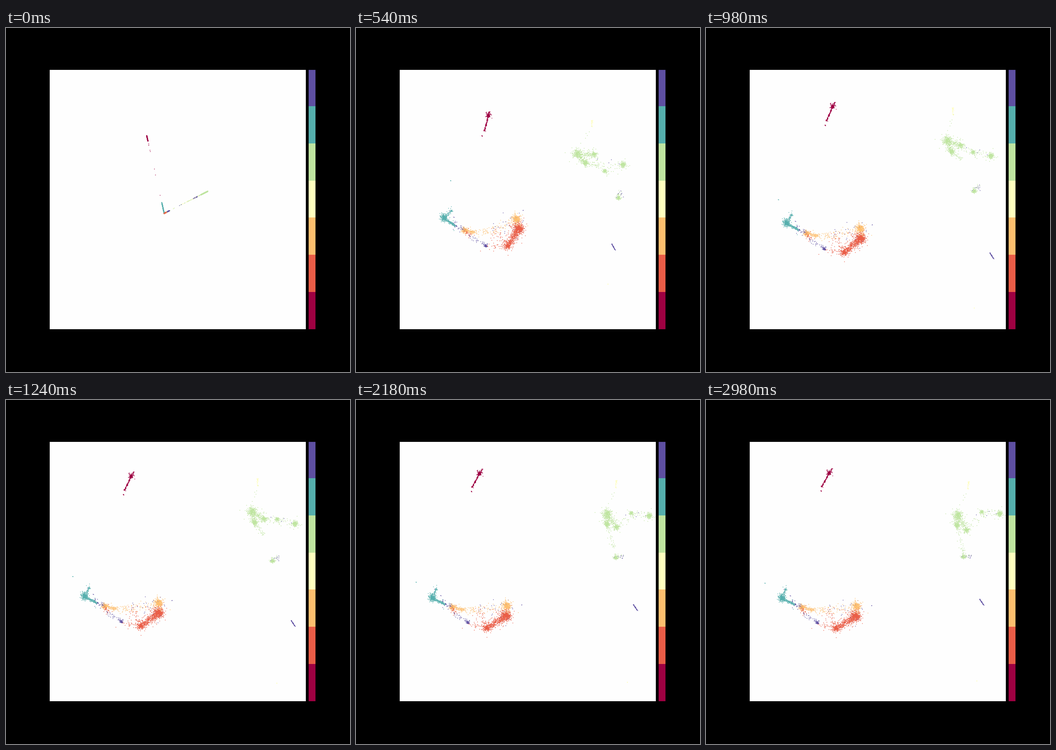
These frames come from a looping animation (748x748 px, 3030 ms). A matplotlib script:

```python
import matplotlib.pyplot as plt
import numpy as np
from matplotlib.animation import FuncAnimation

SIZE, DPI = 748, 100
LOOP, INTERVAL, STEP = 3030, 10, 20
BURST, TURN, LAST = 340, 760, 2980  # ms: end of burst, mid-way, rest
SETTLE = 700
LEFT, RIGHT = 0.125 * SIZE, 651.8
TOP, BOTTOM = 0.12 * SIZE, 0.875 * SIZE
RED, CORAL, ORANGE, YELLOW, GREEN, TEAL, BLUE = range(7)

# name: colour, blob spread, place after the burst, place at rest, optional turn.
ANCHORS = {
    "top": (RED, 0, (299, 202), (274, 149)),
    "waist": (RED, 2.6, (300, 209), (268, 159)),
    "end": (RED, 1.0, (296, 244), (252, 188)),
    "tip": (RED, 0.7, (288, 257), (250, 198)),
    "head": (TEAL, 3.9, (206, 402), (164, 431)),
    "spur": (TEAL, 1.2, (228, 389), (173, 412)),
    "tail": (TEAL, 0, (230, 422), (193, 445)),
    "pale": (ORANGE, 2.9, (252, 433), (208, 450)),
    "pale2": (ORANGE, 0, (272, 437), (235, 457)),
    "sag": (ORANGE, 0, (318, 432), (265, 458)),
    "crown": (ORANGE, 4.6, (361, 396), (327, 449)),
    "right": (CORAL, 5.6, (371, 415), (326, 470)),
    "foot": (CORAL, 3.2, (358, 461), (282, 497)),
    "ink": (BLUE, 0, (268, 443), (213, 463)),
    "ink2": (BLUE, 1.9, (306, 467), (242, 484)),
    "dot": (BLUE, 0.4, (365, 366), (360, 447)),
    "west": (TEAL, 0.5, (252, 292), (128, 398)),
    "main": (GREEN, 4.2, (437, 314), (547, 250), (508, 253)),
    "east": (GREEN, 2.8, (478, 315), (567, 283), (542, 258)),
    "south": (GREEN, 3.0, (460, 327), (546, 273), (522, 276)),
    "drop": (GREEN, 0, (490, 343), (559, 330), (545, 283)),
    "link": (GREEN, 2.4, (500, 350), (600, 244), (567, 286)),
    "far": (GREEN, 3.4, (540, 305), (638, 247), (605, 287)),
    "low": (GREEN, 2.6, (543, 381), (560, 341), (582, 361)),
    "hook": (GREEN, 0, (539, 370), (574, 339), (588, 347)),
    "sun": (YELLOW, 0, (502, 238), (572, 176), (526, 180)),
    "sun2": (YELLOW, 0.7, (499, 248), (569, 192), (526, 195)),
    "seed": (YELLOW, 0.5, (505, 491), (589, 611), (572, 593)),
    "dash": (BLUE, 0, (465, 414), (595, 433), (601, 489)),
    "dash2": (BLUE, 0, (472, 428), (604, 446), (609, 502)),
}

# Colour, two anchors, spread, density.
LINKS = [
    (RED, "top", "waist", 0.7, 3), (RED, "waist", "end", 0.7, 2),
    (TEAL, "head", "tail", 1.6, 3), (TEAL, "head", "spur", 2.6, 0.7),
    (BLUE, "tail", "pale", 2.5, 0.5), (BLUE, "spur", "tail", 3, 0.1),
    (ORANGE, "pale", "pale2", 2.8, 2), (ORANGE, "pale2", "sag", 4.5, 0.2),
    (ORANGE, "sag", "crown", 5, 0.15), (ORANGE, "crown", "right", 5, 0.4),
    (CORAL, "pale", "ink", 3.5, 0.6), (CORAL, "right", "foot", 5, 2),
    (CORAL, "sag", "foot", 7, 0.12), (CORAL, "ink2", "foot", 5, 0.14),
    (BLUE, "ink", "ink2", 3, 0.2), (BLUE, "sag", "crown", 7, 0.04),
    (BLUE, "crown", "right", 11, 0.05),
    (GREEN, "main", "east", 4.5, 0.7), (GREEN, "main", "south", 4, 1.2),
    (GREEN, "south", "drop", 2.6, 0.4), (GREEN, "east", "link", 5, 0.12),
    (GREEN, "link", "far", 4.5, 0.1), (GREEN, "low", "hook", 2, 0.8),
    (BLUE, "low", "hook", 3.5, 0.25), (BLUE, "main", "far", 4, 0.01),
    (GREEN, "main", "sun2", 2.5, 0.03), (YELLOW, "sun", "sun2", 1.3, 1.6),
    (BLUE, "dash", "dash2", 0.3, 2),
]

# The start is an L of two thin rays: which ray, and the stretch filled on it.
CORNER = np.array([344, 403])
UP, ACROSS = np.array([-38, -169]), np.array([95, -48])
BIRTH = {
    RED: (UP, 0.93, 1), TEAL: (UP, 0, 0.14), CORAL: (ACROSS, 0, 0.05),
    ORANGE: (ACROSS, 0, 0.06), YELLOW: (ACROSS, 0.4, 0.8),
    GREEN: (ACROSS, 0.84, 1), BLUE: (ACROSS, 0.06, 0.12),
}
DASH_BIRTH = (ACROSS, 0.68, 0.76)

rng = np.random.default_rng(7)


def progress(t):
    return (1 - np.exp((BURST - t) / SETTLE)) / (1 - np.exp((BURST - LAST) / SETTLE))


def curve(name):
    """Quadratic Bezier points of an anchor, passing its turn at TURN."""
    early, late, *via = np.array(ANCHORS[name][2:], dtype=float)
    turn = via[0] if via else early + 0.62 * (late - early)
    p = progress(TURN)
    bend = (turn - (1 - p) ** 2 * early - p * p * late) / (2 * p * (1 - p))
    return np.array([early, bend, late])


def born(colour, n, x):
    ray, lo, hi = DASH_BIRTH if colour == BLUE and x > 400 else BIRTH[colour]
    reach = rng.uniform(lo, hi, n) - 0.75 * rng.random(n) ** 60
    return CORNER + np.maximum(reach, 0)[:, None] * ray + rng.normal(0, 0.3, (n, 2))


def group(colour, a, b, spread, n):
    """Birth place and curve points of n dots between two anchors."""
    ca, cb = curve(a), curve(b)
    along = rng.random((n, 1))
    noise = rng.normal(0, spread, (n, 2)) * (0.7 + 0.3 * rng.exponential(size=(n, 1)))
    stops = [p + (q - p) * along + noise for p, q in zip(ca, cb)]
    return np.array([born(colour, n, ca[0, 0]), *stops]), np.full(n, colour)


def all_groups():
    for name, (colour, spread, *_) in ANCHORS.items():
        yield group(colour, name, name, spread, round(12 * spread ** 2))
    for colour, a, b, spread, density in LINKS:
        length = np.hypot(*(curve(a)[0] - curve(b)[0]))
        yield group(colour, a, b, spread, round(density * length * max(spread, 1.5)))


dots, shade = zip(*all_groups())
dots, shade = np.concatenate(dots, axis=1), np.concatenate(shade)
order = rng.permutation(len(shade))
birth, early, bend, late = dots[:, order]
shade = shade[order]


def points_at(t):
    if t < BURST:
        return birth + (early - birth) * (t / BURST) ** 0.6
    p = progress(t)
    return (1 - p) ** 2 * early + 2 * p * (1 - p) * bend + p * p * late


fig = plt.figure(figsize=(SIZE / DPI, SIZE / DPI), dpi=DPI, facecolor="black")


def pixel_axes(x0, x1):
    ax = fig.add_axes([x0 / SIZE, 1 - BOTTOM / SIZE,
                       (x1 - x0) / SIZE, (BOTTOM - TOP) / SIZE])
    ax.set(xticks=[], yticks=[])
    return ax


cmap = plt.get_cmap("Spectral", 7)
ax = pixel_axes(LEFT, RIGHT)
ax.set_facecolor("#fefefe")
ax.set(xlim=(LEFT, RIGHT), ylim=(BOTTOM, TOP))
dot_size = (1.55 * 72 / DPI) ** 2
cloud = ax.scatter(*birth.T, s=dot_size, color=cmap(shade), linewidths=0)

bar = pixel_axes(657.2, 0.9 * SIZE)
bar.pcolormesh([0, 1], np.arange(8), np.arange(7)[:, None], cmap=cmap)
bar.set(xticks=[], yticks=[])


def update(i):
    t = min(i * INTERVAL // STEP * STEP, LAST)
    cloud.set_offsets(points_at(t))
    return [cloud]


anim = FuncAnimation(fig, update, frames=LOOP // INTERVAL, interval=INTERVAL,
                     repeat=True, repeat_delay=0)
plt.show()
```
